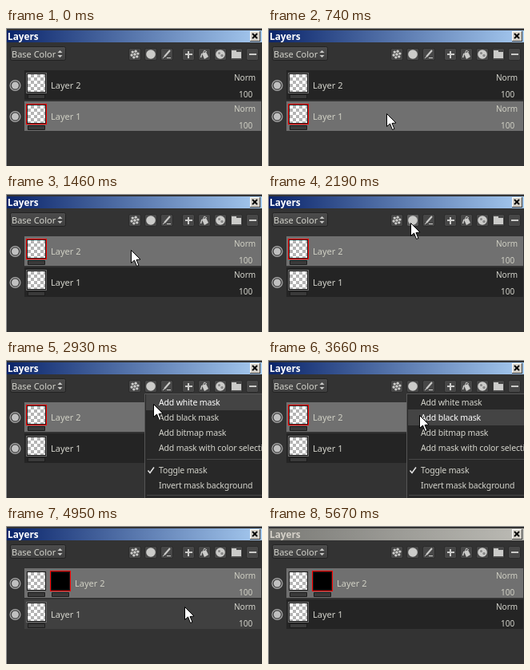
These frames come from a looping animation (320x173 px, 5720 ms). An HTML page with a canvas:

```html
<!DOCTYPE html>
<html lang="en">
<head>
<meta charset="utf-8">
<title>Layers panel</title>
<style>
  html, body { margin: 0; width: 100%; height: 100%; overflow: hidden; background: #333; }
  canvas { display: block; }
</style>
</head>
<body>
<canvas id="stage" width="320" height="173"></canvas>
<script>
const ctx = document.getElementById('stage').getContext('2d');
const LOOP = 5720;
const STEP = 182.4; // the pointer is sampled once per step
const ICON = '#cbcbc9';
const LABEL = '#d4d4cc';

const events = {
  hoverUpper: 920, pickUpper: 1290, hoverButton: 2010, openMenu: 2370,
  hoverWhite: 2930, hoverBlack: 3110, closeMenu: 3830, fillMask: 4210,
  hoverLower: 4950, leaveLower: 5130, deactivate: 5670
};

const linear = p => p;
const smooth = p => p * p * (3 - 2 * p);
const easeOut = power => p => 1 - (1 - p) ** power;

const pointerLegs = [
  { start: 3, steps: 4, from: [139, 152], to: [154, 74], ease: easeOut(3) },
  { start: 7, steps: 5, from: [154, 74], to: [178, 36], ease: smooth },
  { start: 15, steps: 4, from: [178, 36], to: [189, 69], ease: easeOut(3) },
  { start: 26, steps: 1, from: [189, 69], to: [223, 101], ease: linear },
  { start: 27, steps: 2, from: [223, 101], to: [292, 171], ease: easeOut(1.5) }
];

function pointerTip(t) {
  const step = Math.floor(t / STEP);
  const leg = pointerLegs.findLast(({ start }) => start <= step);
  if (!leg || step > 29) return null;
  const p = leg.ease(Math.min(1, (step - leg.start) / leg.steps));
  return leg.from.map((a, i) => Math.round(a + (leg.to[i] - a) * p));
}

function rect(x, y, w, h, color) {
  ctx.fillStyle = color;
  ctx.fillRect(x, y, w, h);
}

function path(points) {
  ctx.beginPath();
  for (const [x, y] of points) ctx.lineTo(x, y);
}

function shape(color, ...points) {
  path(points);
  ctx.fillStyle = color;
  ctx.fill();
}

function line(color, width, ...points) {
  path(points);
  ctx.strokeStyle = color;
  ctx.lineWidth = width;
  ctx.stroke();
}

function disc(x, y, r, color) {
  ctx.fillStyle = color;
  ctx.beginPath();
  ctx.arc(x, y, r, 0, 7);
  ctx.fill();
}

function text(str, x, y, color = LABEL, size = 10.5, weight = 400) {
  ctx.font = `${weight} ${size}px "Noto Sans", "Open Sans", sans-serif`;
  ctx.letterSpacing = size === 10.5 ? '-0.15px' : '0px';
  ctx.fillStyle = color;
  ctx.fillText(str, x, y);
}

function gradient(x0, y0, x1, y1, from, to) {
  const g = ctx.createLinearGradient(x0, y0, x1, y1);
  g.addColorStop(0, from);
  g.addColorStop(1, to);
  return g;
}

function box(x, y, w, h, fill, border, radius = 2) {
  ctx.beginPath();
  ctx.roundRect(x + .5, y + .5, w - 1, h - 1, radius);
  ctx.fillStyle = fill;
  ctx.fill();
  ctx.strokeStyle = border;
  ctx.lineWidth = 1;
  ctx.stroke();
}

function titleBar(active) {
  const colors = active ? ['#0a246a', '#a6caf0'] : ['#7a7a76', '#bcbbb5'];
  rect(1, 3, 319, 15, gradient(1, 0, 320, 0, ...colors));
  text('Layers', 2, 15, active ? '#fff' : '#d4d0c8', 11.8, 700);
  rect(305, 4, 13, 13, '#404040');
  rect(305, 4, 12, 12, '#fff');
  rect(306, 5, 11, 11, '#d4d0c8');
  line('#000', 1.8, [308, 7], [314, 13]);
  line('#000', 1.8, [314, 7], [308, 13]);
}

// Toolbar icons, each drawn in a 16 px square whose corner is the canvas origin.
const icons = [
  function noise() {
    for (let i = 0; i < 6; i++) {
      disc(8 + 4 * Math.cos(i * 1.05 + .8), 8 + 4 * Math.sin(i * 1.05 + .8), 1.7, ICON);
    }
    disc(8, 8, 1.8, ICON);
  },
  function mask() {
    disc(8, 8, 5.8, ICON);
  },
  function brush() {
    line(ICON, 2, [12, 3], [5, 11]);
    line(ICON, 1, [5, 11], [3, 13]);
    line(ICON, 1, [8, 12.5], [13, 12.5]);
  },
  function plus() {
    rect(4, 7, 9, 2, ICON);
    rect(7, 4, 2, 9, ICON);
  },
  function bucket() {
    shape(ICON, [5, 7], [10, 5], [13, 11], [8, 14]);
    line(ICON, 1, [6, 7], [8, 3], [11, 5]);
    line(ICON, 1.5, [5, 7], [3.5, 12]);
  },
  function sphere() {
    disc(8, 8, 5.8, ICON);
    disc(6.5, 6.5, 1.5, '#888');
    disc(10, 9.5, 1.7, '#888');
  },
  function folder() {
    rect(2, 3, 6, 3, ICON);
    rect(2, 5, 12, 8, ICON);
  },
  function minus() {
    rect(4, 7, 9, 2, ICON);
  }
];

function toolbar(hovered) {
  box(5, 23, 70, 18, gradient(0, 23, 0, 41, '#4d4d4d', '#3e3e3e'), '#222');
  text('Base Color', 7, 37, LABEL, 11);
  shape(ICON, [64.5, 31], [67.5, 28], [70.5, 31]);
  shape(ICON, [64.5, 34], [67.5, 37], [70.5, 34]);
  icons.forEach((icon, i) => {
    ctx.save();
    ctx.translate((i < 3 ? 153 : 160) + 20 * i, 25);
    box(0, 0, 16, 16, hovered && i === 1 ? '#5c5c5c' : '#474747', '#2a2a2a');
    icon();
    ctx.restore();
  });
}

function checker(x, y, size, cell = 4) {
  rect(x, y, size, size, '#fff');
  for (let j = 0; j < size; j += cell) {
    for (let i = 0; i < size; i += cell) {
      if ((i + j) / cell % 2) {
        rect(x + i, y + j, Math.min(cell, size - i), Math.min(cell, size - j), '#b4b4b4');
      }
    }
  }
}

function thumbnail(x, y, active, black) {
  rect(x, y, 26, 26, active ? '#f00' : '#6c6c6c');
  rect(x + 1, y + 1, 24, 24, '#1c1c1c');
  if (black) rect(x + 2, y + 2, 22, 22, '#000');
  else checker(x + 2, y + 2, 22);
  box(x + 2, y + 27, 22, 6, '#3a3a3a', '#1c1c1c', 0);
}

function layer(name, y, state, mask) {
  const selected = state === 'selected';
  const fills = { normal: '#242424', hover: '#404040', selected: '#707070' };
  const color = selected ? '#d0d0c4' : LABEL;
  rect(23, y, 296, 37, fills[state]);
  disc(11.5, y + 19, 7, '#aaa');
  disc(11.5, y + 19, 5.8, '#3c3c3c');
  disc(11.5, y + 19, 4.5, '#c0c0c0');
  thumbnail(25, y + 3, selected && !mask, false);
  if (mask) thumbnail(55, y + 3, true, mask === 'black');
  text(name, mask ? 86 : 56, y + 23, color, 11);
  text('Norm', 285, y + 13, color, 10);
  text('100', 291, y + 34, color, 10);
}

function menu(hovered) {
  const labels = ['Add white mask', 'Add black mask', 'Add bitmap mask',
    'Add mask with color selection', 'Toggle mask', 'Invert mask background'];
  rect(173, 42, 147, 131, '#555');
  rect(174, 43, 146, 130, '#282828');
  if (hovered >= 0) rect(175, 43 + hovered * 19, 145, 20, '#444');
  labels.forEach((label, i) => {
    text(label, 191, 57 + 19 * i + (i > 3 ? 9 : 0), i === hovered ? '#fff' : LABEL);
  });
  for (const y of [124, 169]) rect(176, y, 144, 1, '#484848');
  line('#e4e4e4', 1.5, [177.5, 138.5], [180, 141.5], [185, 134.5]);
}

function pointer([x, y]) {
  ctx.save();
  ctx.translate(x + .5, y + .5);
  ctx.lineJoin = 'round';
  const outline = [[0, 0], [0, 16], [4, 12.5], [7, 20], [9.5, 19], [6.5, 12], [11.5, 11.5], [0, 0]];
  shape('#fff', ...outline);
  line('#000', 1, ...outline);
  ctx.restore();
}

function draw(t) {
  const during = (start, end) => t >= events[start] && t < events[end];
  const after = name => t >= events[name];

  rect(0, 0, 320, 173, '#333');
  rect(0, 0, 320, 1, '#999');
  rect(0, 0, 1, 173, '#999');
  titleBar(!after('deactivate'));
  toolbar(during('hoverButton', 'openMenu'));

  const upper = after('pickUpper') ? 'selected' : after('hoverUpper') ? 'hover' : 'normal';
  const lower = !after('pickUpper') ? 'selected'
    : during('hoverLower', 'leaveLower') ? 'hover' : 'normal';
  const mask = after('fillMask') ? 'black' : after('closeMenu') ? 'pending' : null;
  layer('Layer 2', 53, upper, mask);
  layer('Layer 1', 92, lower, null);

  if (during('openMenu', 'closeMenu')) menu(after('hoverBlack') ? 1 : after('hoverWhite') ? 0 : -1);
  const tip = pointerTip(t);
  if (tip) pointer(tip);
}

function tick() {
  draw(performance.now() % LOOP);
  requestAnimationFrame(tick);
}
tick();
</script>
</body>
</html>
```
